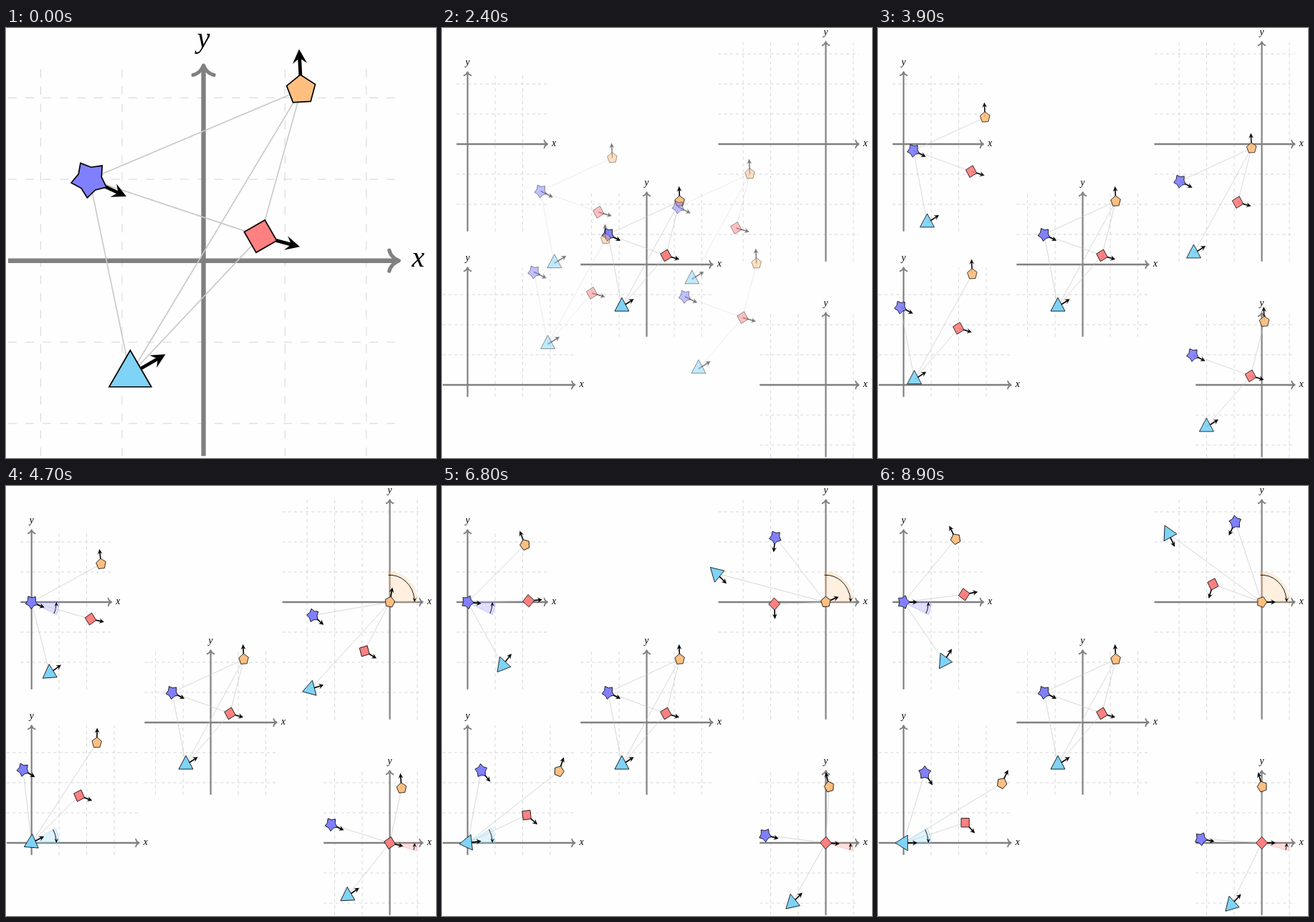
These frames come from a looping animation (600 px wide and 600 px high, 9.3 s). An HTML page with a canvas:

```html
<!DOCTYPE html>
<html>
<head>
<meta charset="utf-8">
<style>
html, body { margin: 0; width: 100%; height: 100%; overflow: hidden; background: #fefefe; }
canvas { display: block; }
</style>
</head>
<body>
<canvas id="stage" width="600" height="600"></canvas>
<script>
const ctx = document.getElementById('stage').getContext('2d');
const LOOP = 9300, U = 113.6, RAD = Math.PI / 180;

// Positions in grid units with y up; angles in degrees, counterclockwise.
// turn is the first corner relative to the heading; home is the origin of the node's own axes;
// box is left, right, bottom, top of those axes.
const nodes = [
  { x: -1.4, y: 1, angle: -25, sides: 5, r: 26, inner: 17, turn: 0, color: '#8080ff',
    home: [-6.5, 4], box: [-0.4, 2.9, -2.9, 2.4] },
  { x: 1.2, y: 2.1, angle: 93, sides: 5, r: 21, turn: 0, color: '#ffbf80',
    home: [6.5, 4], box: [-3.9, 1.2, -3.9, 3.4] },
  { x: 0.7, y: 0.3, angle: -15, sides: 4, r: 23.5, turn: 0, color: '#ff8080',
    home: [6.5, -4], box: [-2.4, 1.2, -2.4, 2.4] },
  { x: -0.9, y: -1.4, angle: 30, sides: 3, r: 34, turn: 60, color: '#7fd3f7',
    home: [-6.5, -4], box: [-0.9, 3.9, -0.4, 3.9] }
];
const mainBox = [-2.4, 2.4, -2.4, 2.4];
const wide = { x: 275.6, y: 324.7, sx: 1, sy: 1 };
const small = { x: 285.6, y: 330, sx: 38.45 / U, sy: 42 / U };
let view = wide;

// Runs draw with the origin moved to (x, y) in grid units.
function at(x, y, draw) {
  ctx.save();
  ctx.translate(x * U, -y * U);
  draw();
  ctx.restore();
}

// Lines keep a least width on screen when the view is small.
function stroke(color, width, least = 0) {
  ctx.strokeStyle = color;
  ctx.lineWidth = Math.max(width, least / view.sy);
  ctx.stroke();
}

function line(x1, y1, x2, y2) {
  ctx.beginPath();
  ctx.moveTo(x1 * U, -y1 * U);
  ctx.lineTo(x2 * U, -y2 * U);
}

function axisTip(x, y, angle) {
  at(x, y, () => {
    ctx.rotate(angle);
    ctx.beginPath();
    ctx.moveTo(-13.5, -14.5);
    ctx.bezierCurveTo(-11.5, -6, -4, -1.5, 0, 0);
    ctx.bezierCurveTo(-4, 1.5, -11.5, 6, -13.5, 14.5);
    ctx.lineCap = ctx.lineJoin = 'round';
    stroke('#808080', 5.2);
  });
}

function axes([left, right, bottom, top]) {
  ctx.setLineDash([12, 12]);
  for (let x = Math.ceil(left); x <= right; x++) {
    if (x) { line(x, bottom, x, top); stroke('#d5d5da', 1, 1); }
  }
  for (let y = Math.ceil(bottom); y <= top; y++) {
    if (y) { line(left, y, right, y); stroke('#d5d5da', 1, 1); }
  }
  ctx.setLineDash([]);
  line(left, 0, right - 0.03, 0);
  stroke('#808080', 6.4);
  line(0, bottom, 0, top - 0.03);
  stroke('#808080', 6.4);
  axisTip(right, 0, 0);
  axisTip(0, top, -Math.PI / 2);
  ctx.fillStyle = '#000';
  ctx.font = 'italic 40px "Liberation Serif", serif';
  ctx.textAlign = 'center';
  ctx.fillText('x', right * U + 27, 8);
  ctx.fillText('y', 0, -top * U - 25);
}

// Barbed arrowhead with its tip at (x, y) in pixels, pointing along angle.
function head(x, y, angle, a) {
  ctx.save();
  ctx.translate(x, y);
  ctx.rotate(angle);
  ctx.beginPath();
  ctx.moveTo(0, 0);
  ctx.lineTo(-8 * a, 4 * a);
  ctx.lineTo(-5 * a, 0);
  ctx.lineTo(-8 * a, -4 * a);
  ctx.fillStyle = '#000';
  ctx.fill();
  ctx.restore();
}

function drawNode(n) {
  at(n.x, n.y, () => {
    ctx.rotate(-n.angle * RAD);
    line(0, 0, 0.4, 0);
    ctx.lineCap = 'butt';
    stroke('#000', 4.8);
    head(U / 2, 0, 0, 2.5);
    const count = n.inner ? n.sides * 2 : n.sides;
    ctx.beginPath();
    for (let i = 0; i < count; i++) {
      const r = n.inner && i % 2 ? n.inner : n.r;
      const a = i / count * 2 * Math.PI - n.turn * RAD;
      ctx.lineTo(r * Math.cos(a), r * Math.sin(a));
    }
    ctx.closePath();
    ctx.fillStyle = n.color;
    ctx.fill();
    ctx.lineJoin = 'miter';
    stroke('#000', 1.7, 0.8);
  });
}

function edge(a, b) {
  line(a.x, a.y, b.x, b.y);
  stroke('#c8c8c8', 1.6, 0.75);
}

// Sector between the x axis and the node's heading, with an arrow back to the axis.
function sector(n) {
  const end = -n.angle * RAD, cw = end > 0;
  ctx.beginPath();
  ctx.moveTo(0, 0);
  ctx.arc(0, 0, U, 0, end, !cw);
  ctx.closePath();
  ctx.fillStyle = n.color;
  ctx.globalAlpha = 0.25;
  ctx.fill();
  ctx.globalAlpha = 0.5;
  stroke(n.color, 1.6, 0.7);
  ctx.globalAlpha = 1;
  const r = 0.9 * U, stop = (cw ? 1 : -1) * 0.1;
  ctx.beginPath();
  ctx.arc(0, 0, r, end, stop, cw);
  stroke('#000', 2.6);
  head(r, 0, cw ? -Math.PI / 2 : Math.PI / 2, 2);
}

// The group as owner sees it: shifted to its own axes, then turned around it.
function copy(owner, move, turn) {
  const dx = move * (owner.home[0] - owner.x), dy = move * (owner.home[1] - owner.y);
  const a = -owner.angle * turn;
  const c = Math.cos(a * RAD), s = Math.sin(a * RAD);
  const group = nodes.map(n => {
    const x = n.x - owner.x, y = n.y - owner.y;
    return { ...n, x: owner.x + dx + x * c - y * s, y: owner.y + dy + x * s + y * c, angle: n.angle + a };
  });
  const self = group[nodes.indexOf(owner)];
  ctx.globalAlpha = move;
  for (const n of group) if (n !== self) edge(self, n);
  group.forEach(drawNode);
  ctx.globalAlpha = 1;
}

function render(time) {
  const step = Math.floor(time % LOOP / 100);
  const split = step >= 8, turning = step >= 42;
  const move = Math.min(1, Math.max(0, (step - 8) * 0.03));
  const turn = Math.min(1, Math.max(0, (step - 42) * 0.03));
  view = split ? small : wide;
  ctx.setTransform(1, 0, 0, 1, 0, 0);
  ctx.fillStyle = '#fefefe';
  ctx.fillRect(0, 0, 600, 600);
  ctx.setTransform(view.sx, 0, 0, view.sy, view.x, view.y);

  axes(mainBox);
  if (split) {
    for (const n of nodes) {
      at(...n.home, () => {
        axes(n.box);
        if (turning) sector(n);
      });
    }
  }
  nodes.forEach((n, i) => nodes.slice(i + 1).forEach(m => edge(n, m)));
  nodes.forEach(drawNode);
  if (split) nodes.forEach(n => copy(n, move, turn));
}

const start = performance.now();
function tick() {
  render(performance.now() - start);
  requestAnimationFrame(tick);
}
tick();
</script>
</body>
</html>
```
